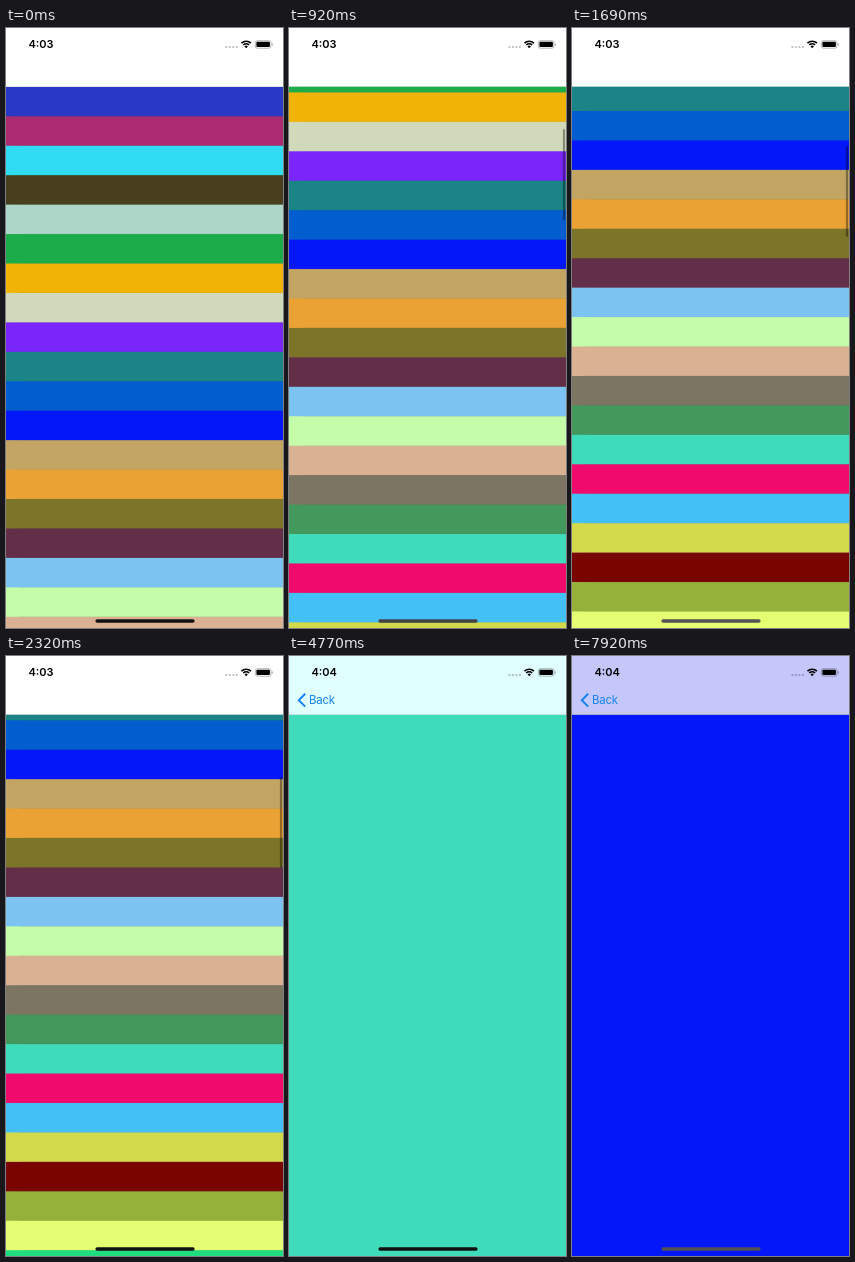
Recreate the animation shown at these times as an HTML page with a canvas. Size 277 by 600 pixels, loop 7990 ms.

```html
<!DOCTYPE html>
<html lang="en">
<head>
<meta charset="utf-8">
<title>Colour list</title>
<style>
  html, body { margin: 0; width: 100%; height: 100%; overflow: hidden; background: #fff; }
  canvas { display: block; width: 277px; height: 600px; }
</style>
</head>
<body>
<canvas id="stage"></canvas>
<script>
const W = 277, H = 600, LOOP = 7990, TICK = 70, START = 500;
const BAR = 58.87, ROW = 29.44, REST = 294.4;
const GREY = '#d8d8dc', TINT = '#1483f5';

const colors = ('2a38c6 ab2a70 2fdcf3 473f1d aed6c8 1cac4a f2b307 d0d9b9 7a26fb 1a8486 ' +
  '025ecf 0417f8 c2a562 e9a233 7c7428 632f48 7cc3f1 c4fca9 dab293 7b7562 ' +
  '43985c 3fdcbb f00a6c 43c0f5 d2da4b 780500 96b13a e5fd72 20dd80')
  .split(' ').map(c => '#' + c);

// Pushed pages: list row, touch time, slide start and bar colour
const visits = [
  { row: 21, touch: 3930, push: 4100, length: 520, back: 5820, pop: 5960, bar: '#e0ffff' },
  { row: 11, touch: 7430, push: 7430, length: 480, back: 1e9, pop: 1e9, bar: '#c5c7fb' }
];

// Brightness of the home indicator, which follows what lies below it
const homeTone = [[500, 17], [640, 52], [1200, 84], [1700, 84], [2250, 17],
                  [7500, 17], [7850, 82], [7990, 82]];

const canvas = document.getElementById('stage');
const ctx = canvas.getContext('2d');
const dpr = window.devicePixelRatio || 1;
canvas.width = W * dpr;
canvas.height = H * dpr;

const clamp = v => Math.min(1, Math.max(0, v));

function lerpTable(table, t) {
  if (t <= table[0][0]) return table[0][1];
  for (let i = 1; i < table.length; i++) {
    const [t0, a] = table[i - 1], [t1, b] = table[i];
    if (t <= t1) return a + (b - a) * (t - t0) / (t1 - t0);
  }
  return table[table.length - 1][1];
}

// Critically damped spring, settled at p = 1
function spring(p) {
  if (p <= 0) return 0;
  return p >= 1 ? 1 : 1 - (1 + 9 * p) * Math.exp(-9 * p);
}

// Short drag, then a fling that decays almost exponentially
function scrollAt(t) {
  if (t < 500) return 0;
  if (t < 640) return 23 + 30 * (t - 500) / 70;
  if (t >= 2740) return REST;
  const s = t - 640;
  return REST - 211.4 * Math.exp(-(0.0018739 * s + 1.838e-7 * s * s));
}

function rect(x, y, w, h, color) {
  ctx.fillStyle = color;
  ctx.fillRect(x, y, w, h);
}

function pill(x, y, w, h, r, color) {
  ctx.beginPath();
  ctx.roundRect(x, y, w, h, r);
  ctx.fillStyle = color;
  ctx.fill();
}

function text(str, x, y, font, color) {
  ctx.font = font;
  ctx.fillStyle = color;
  ctx.fillText(str, x, y);
}

function drawList(t, shift, selected) {
  const offset = scrollAt(t);
  ctx.save();
  ctx.beginPath();
  ctx.rect(0, BAR, W, H - BAR);
  ctx.clip();
  ctx.translate(shift, 0);
  colors.forEach((color, i) => {
    const y = BAR + i * ROW - offset;
    if (y > H || y + ROW < BAR) return;
    rect(0, y, W, ROW + 1, i === selected ? GREY : color);
    rect(13.4, y - 0.22, W, 0.22, 'rgba(60,60,67,.29)');
  });
  const alpha = t < START ? 0 : 0.36 * clamp((2810 - t) / 300);
  if (alpha > 0) pill(273.9, 72 + 0.17 * offset, 2.2, 91, 1.1, `rgba(0,0,0,${alpha})`);
  ctx.restore();
}

function drawBack(shown, dimmed) {
  ctx.save();
  ctx.globalAlpha = shown * (dimmed ? 0.3 : 1);
  ctx.strokeStyle = TINT;
  ctx.lineWidth = 2;
  ctx.beginPath();
  ctx.moveTo(16.2, 37.8);
  ctx.lineTo(9.8, 44.2);
  ctx.lineTo(16.2, 50.6);
  ctx.stroke();
  ctx.letterSpacing = '-0.2px';
  text('Back', 20 + 70 * (1 - shown), 48.2, '400 11.4px Inter, sans-serif', TINT);
  ctx.restore();
}

function drawStatus(t) {
  text(t < 2600 ? '4:03' : '4:04', 22.4, 20.4, '600 11px Inter, sans-serif', '#000');
  for (let i = 0; i < 4; i++) pill(219.2 + i * 3.5, 17.9, 2.3, 2.3, 1.15, 'rgba(0,0,0,.25)');

  ctx.strokeStyle = '#000';
  ctx.lineWidth = 1.6;
  for (const r of [6.7, 4.1]) {
    ctx.beginPath();
    ctx.arc(240.2, 19.9, r, -Math.PI * 0.75, -Math.PI * 0.25);
    ctx.stroke();
  }
  ctx.beginPath();
  ctx.moveTo(240.2, 20.3);
  ctx.arc(240.2, 20.1, 2.4, -Math.PI * 0.75, -Math.PI * 0.25);
  ctx.fillStyle = '#000';
  ctx.fill();

  ctx.strokeStyle = 'rgba(0,0,0,.4)';
  ctx.lineWidth = 0.7;
  ctx.beginPath();
  ctx.roundRect(249.3, 12.7, 15.7, 7.5, 2);
  ctx.stroke();
  pill(250.4, 13.8, 13.5, 5.3, 1, '#000');
  pill(265.8, 15.2, 0.9, 2.6, 0.5, 'rgba(0,0,0,.4)');
}

function draw(t) {
  const visit = t < 7000 ? visits[0] : visits[1];
  const shown = t < visit.pop
    ? spring((t - visit.push) / visit.length)
    : 1 - spring((t - visit.pop + 20) / 500);
  const selected = t >= visit.touch ? visit.row
    : visit === visits[1] ? visits[0].row : -1;

  ctx.setTransform(dpr, 0, 0, dpr, 0, 0);
  rect(0, 0, W, H, '#fff');
  if (shown < 1) drawList(t, -0.3 * W * shown, selected);
  if (shown > 0) {
    const x = W * (1 - shown);
    rect(0, BAR, x, H - BAR, `rgba(0,0,0,${0.1 * shown})`);
    rect(x, 0, W, BAR, visit.bar);
    rect(x, BAR, W, H - BAR, colors[visit.row]);
    drawBack(shown, t >= visit.back);
  }
  rect(0, BAR - 0.3, W, 0.3, 'rgba(0,0,0,.25)');
  drawStatus(t);
  const tone = Math.round(lerpTable(homeTone, t));
  pill(89.4, 591.2, 99.2, 3.5, 1.75, `rgb(${tone},${tone},${tone})`);
}

function frame() {
  const t = performance.now() % LOOP;
  draw(t < START ? 0 : START + Math.floor((t - START) / TICK) * TICK);
  requestAnimationFrame(frame);
}
frame();
</script>
</body>
</html>
```
